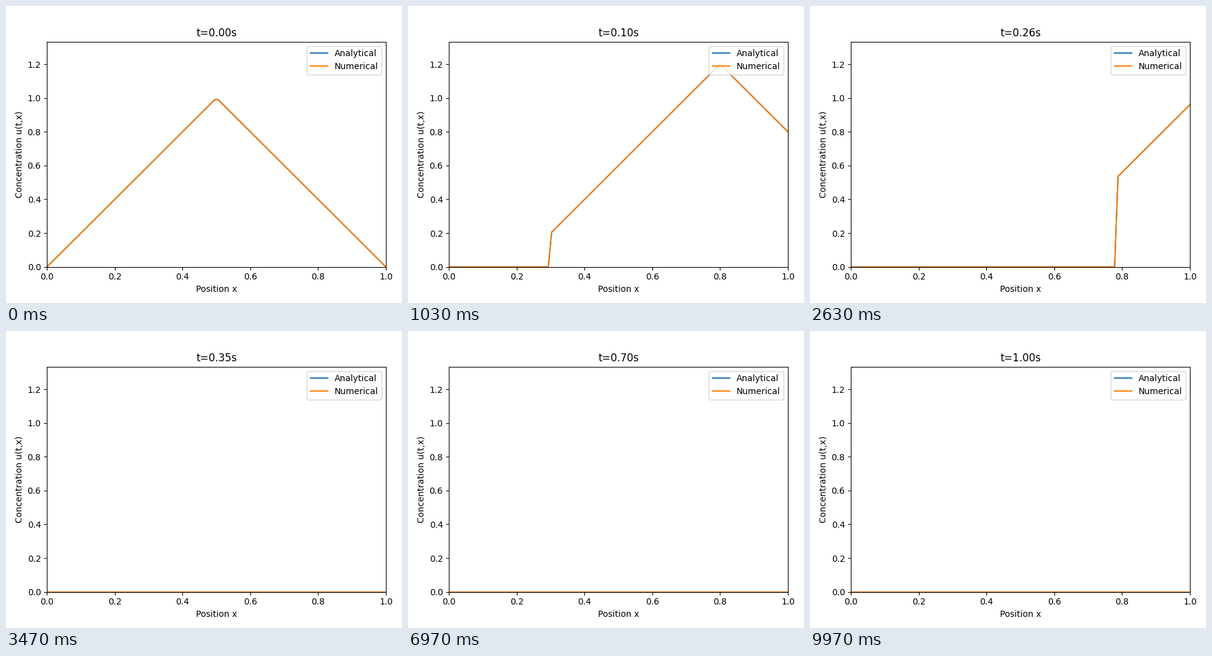
These frames come from a looping animation (640 px wide and 480 px high, 10000 ms). A matplotlib script:

```python
import numpy as np
import matplotlib.pyplot as plt
from matplotlib.animation import FuncAnimation

LOOP_MS = 10000
FRAMES = 300
SPEED = 3.0    # advection velocity
SOURCE = 2.0   # constant production rate

x = np.linspace(0, 1, 100)


def initial(pos):
    """Triangular starting profile with its peak at the centre."""
    return 1 - np.abs(2 * pos - 1)


def solution(t):
    """Profile carried along the characteristics, empty behind the front."""
    origin = x - SPEED * t
    return np.where(origin >= 0, initial(origin) + SOURCE * t, 0.0)


fig, ax = plt.subplots(figsize=(6.4, 4.8), dpi=100)
lines = [ax.plot(x, solution(0), label=name)[0]
         for name in ("Analytical", "Numerical")]
ax.set_xlim(0, 1)
ax.set_ylim(0, 1 + SOURCE * 0.5 / SPEED)
ax.set_xlabel("Position x")
ax.set_ylabel("Concentration u(t,x)")
ax.legend(loc="upper right")
title = ax.set_title("t=0.00s")
fig.tight_layout()
fig.subplots_adjust(top=0.88)


def update(frame):
    t = frame / FRAMES
    u = solution(t)
    for line in lines:
        line.set_ydata(u)
    title.set_text(f"t={t:.2f}s")
    return [*lines, title]


anim = FuncAnimation(fig, update, frames=FRAMES, interval=LOOP_MS / FRAMES,
                     repeat=True, repeat_delay=0, blit=False)
plt.show()
```
